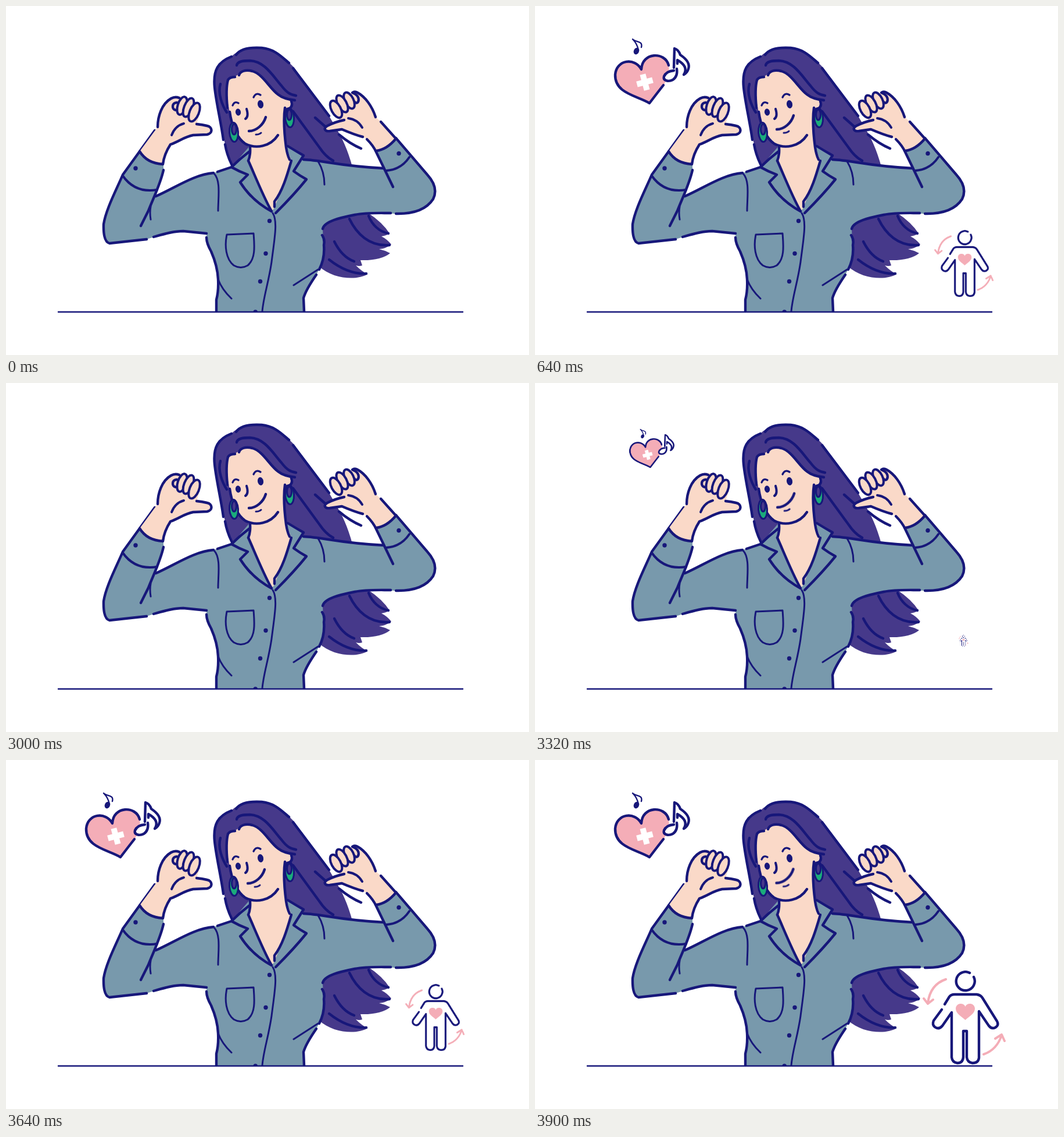
An HTML page without scripts that plays this animation: 900 px wide and 600 px high, repeating every 6 s.

```html
<!DOCTYPE html>
<html lang="en">
<head>
<meta charset="utf-8">
<title>Confident woman</title>
<style>
  :root { --ink: #17177a; --hair: #46398a; --skin: #fad9c8; --shirt: #7899ac; --pink: #f4adb7; --green: #1bab7b; }
  html, body { margin: 0; width: 100%; height: 100%; overflow: hidden; background: #fff; }
  svg { display: block; width: 100%; height: 100%; }
  path, ellipse, circle { stroke-linecap: round; stroke-linejoin: round; }
  .line { fill: none; stroke: var(--ink); stroke-width: 4.4; }
  .thin { fill: none; stroke: var(--ink); stroke-width: 3; }
  .fine { fill: none; stroke: var(--ink); stroke-width: 2.4; }
  .ink { fill: var(--ink); }
  .hair { fill: var(--hair); }
  .skin { fill: var(--skin); }
  .shirt { fill: var(--shirt); }
  .pink { fill: var(--pink); }
  .arrow { fill: none; stroke: var(--pink); stroke-width: 4; }
  .ring { fill: var(--green); stroke: var(--ink); stroke-width: 3; }
  .finger { fill: var(--skin); stroke: var(--ink); stroke-width: 4; }

  .music, .body, .mouth { animation: 3s infinite cubic-bezier(.3, .09, .58, .87); }
  .music { transform-origin: 200.5px 112.5px; animation-name: pop; }
  .body { transform-origin: 737px 443px; animation-name: pop-late; }
  .mouth { animation-name: smile; }
  @keyframes pop { 0% { transform: scale(0); } 20%, 100% { transform: none; } }
  @keyframes pop-late { 0%, 6.667% { transform: scale(0); } 30%, 100% { transform: none; } }
  @keyframes smile { 0% { transform: none; } 30%, 100% { transform: translate(-2.5px, -3.6px); } }
</style>
</head>
<body>
<svg viewBox="0 0 900 600">
  <!-- hair behind -->
  <g class="hair">
    <path d="M389 278C374 235 362 170 359 140C356 110 365 96 388 87C400 74 424 70 440 71C462 73 474 87 488 98L496 106L556 189L575 222Q588 246 597 280L480 300Z"/>
    <path d="M622 355Q648 372 660 391Q654 395 646 396Q656 401 663 410Q654 417 642 418Q652 420 661 425Q645 438 610 437L613 446Q608 448 602 446Q612 456 622 461C607 471 565 472 538 447L545 372Z"/>
  </g>
  <g class="line">
    <path d="M624 361C630 376 642 388 658 391M591 366C603 391 625 414 660 411M565 405C574 423 585 434 599 439M556 436C575 451 598 461 620 460"/>
    <path d="M494 181L540 244Q550 259 563 266M532 192L549 207M573 221Q592 237 611 245"/>
    <path d="M388 87C365 96 356 110 359 140C362 168 370 200 374 230M377 238Q380 256 389 274"/>
    <path d="M396 84C404 72 424 71 440 72C462 74 474 87 487 98M494 107L556 189"/>
    <path d="M369 134C364 150 372 171 380 183"/>
  </g>

  <!-- shirt -->
  <path class="shirt" d="M230 250L201 290C188 320 172 350 168 375Q167 405 178 408L242 401C275 391 290 387 305 387L345 391V398Q345 408 353 422Q364 447 365 470Q366 490 362 505V526H513L512 502Q516 488 534 462Q550 435 546 408L545 383C548 370 575 364 600 359C620 355 640 356 668 357Q718 358 735 332Q745 312 725 290L671 227L637 249L651 279C570 275 545 265 512 264V257L484 240H420L388 277L357 287C330 290 290 313 258 327L271 282V272Z"/>

  <!-- head and neck -->
  <path class="skin" d="M381 126Q384 122 394 121Q400 119 402 114Q412 109 424 112C442 117 454 142 468 152Q478 160 491 163Q495 176 480 175C477 195 479 220 482 243L491 265C484 290 474 318 460 350L456 351C442 326 427 288 417 266L420 243C398 232 388 205 384 178C380 160 379 140 381 126Z"/>
  <g class="line">
    <path d="M381 175C379 155 379 138 382 127Q385 122 394 122M401 119C403 112 412 109 424 112C442 117 454 142 468 152Q478 160 497 162"/>
    <path d="M397 102C398 95 408 94 420 94C445 95 459 120 474 137C483 149 490 153 499 154"/>
    <path d="M385 182C388 205 398 228 412 237C430 246 455 242 468 222"/>
    <path d="M491 164Q494 172 488 176M480 175C477 195 479 220 482 243Q484 256 488 264M420 243Q421 256 417 266"/>
    <path d="M414 177Q418 190 412 194" stroke-width="4"/>
    <path d="M390 171Q393 163 400 167M426 157Q430 148 438 153" stroke-width="3.300"/>
  </g>
  <ellipse class="ink" cx="399.500" cy="182.500" rx="4.600" ry="6" transform="rotate(-10 399.500 182.500)"/>
  <ellipse class="ink" cx="438" cy="169" rx="5" ry="7" transform="rotate(-10 438 169)"/>
  <g class="mouth line">
    <path d="M418 215C431 215 443 204 447 191"/>
    <path d="M430 221Q436 221 439 218" stroke-width="3"/>
  </g>
  <g class="ring">
    <ellipse cx="392" cy="217" rx="7.500" ry="16.500" transform="rotate(-4 392 217)"/>
    <ellipse class="hair" cx="392.500" cy="212" rx="4" ry="9"/>
    <ellipse cx="488" cy="192" rx="7.500" ry="16.500" transform="rotate(-4 488 192)"/>
    <ellipse class="hair" cx="487.500" cy="187" rx="4" ry="9"/>
  </g>

  <!-- shirt details -->
  <g class="line">
    <path d="M419 250Q402 263 388 277Q402 285 416 290L403 303C417 325 436 342 457 353"/>
    <path d="M417 266C427 288 442 326 456 351"/>
    <path d="M485 241Q498 249 512 257L495 284Q506 292 517 298Q496 324 464 356"/>
    <path d="M491 266C484 290 476 318 462 336V345"/>
    <path d="M258 327C290 313 325 289 357 287M364 285L388 277M512 264C545 265 570 275 650 279"/>
    <path d="M256 214L201 290C188 320 172 350 168 375Q167 405 178 408L242 401M254 397C275 391 290 387 305 387L345 391"/>
    <path d="M271 282C266 305 255 327 245 352L232 378"/>
    <path d="M671 227L725 290Q745 312 735 332Q718 358 671 357M662 356C640 356 620 355 600 359C575 364 548 370 545 383"/>
    <path d="M345 398Q345 408 353 422Q364 447 365 470Q366 490 362 505V525M544 394Q549 401 547 411Q549 434 539 453M534 462Q516 488 512 502L513 525"/>
  </g>
  <g class="thin">
    <path d="M358 288C370 300 365 330 365 352M537 267Q548 285 548 307M249 345Q247 355 249 367"/>
    <path d="M201 292C215 312 235 320 260 316M655 283Q680 281 694 260" stroke-width="4"/>
    <path d="M365 470Q372 488 388 503M495 480L537 453"/>
    <path d="M459 356C468 370 462 400 457 440C452 475 443 500 441 525"/>
    <path d="M380 393L426 391C428 415 429 435 416 446Q404 453 392 446C378 435 376 412 380 393Z"/>
  </g>
  <g class="ink">
    <circle cx="223" cy="279" r="3.700"/>
    <circle cx="676" cy="253.500" r="3.700"/>
    <circle cx="453.500" cy="369.500" r="3.700"/>
    <circle cx="447" cy="425.500" r="3.700"/>
    <circle cx="437.500" cy="473.500" r="3.700"/>
    <path d="M425.500 526a3.700 3.700 0 0 1 7.400 0z"/>
  </g>

  <!-- left hand -->
  <path class="skin" d="M230 250L261 208C261 190 268 168 284 159Q300 151 316 159Q336 168 333 186L328 203L346 206C356 210 356 219 346 221L322 222C306 225 298 233 283 238Q276 250 270 272C252 271 238 263 230 250Z"/>
  <g class="line">
    <path d="M230 250C238 263 252 271 270 272Q272 255 283 238C298 233 306 225 322 222L346 221C356 219 356 208 346 206Q338 204 328 203"/>
    <path d="M261 208C261 190 268 168 284 159Q291 155 298 158"/>
    <path d="M285 222Q291 206 306 202" stroke-width="4"/>
    <path d="M294 166C285 166 285 178 292 179"/>
  </g>
  <g class="finger">
    <ellipse cx="303" cy="171.500" rx="7.500" ry="16" transform="rotate(18 303 171.500)"/>
    <ellipse cx="314" cy="174.500" rx="7.500" ry="17" transform="rotate(22 314 174.500)"/>
    <ellipse cx="324" cy="182.500" rx="8" ry="17" transform="rotate(22 324 182.500)"/>
  </g>

  <!-- right hand -->
  <path class="skin" d="M645 199L671 228Q655 247 637 249Q632 240 621 228L603 221L578 212L557 215C548 216 546 209 553 206L575 197L561 184C555 176 558 164 568 163Q570 152 580 154Q585 147 594 150Q600 145 605 149C618 156 630 172 636 191Z"/>
  <g class="line">
    <path d="M636 191C630 172 618 156 605 149Q600 146 596 149"/>
    <path d="M582 196Q567 199 553 206C546 210 548 216 557 215L578 212C592 218 602 222 614 225"/>
    <path d="M589 193Q605 195 613 209" stroke-width="4"/>
    <path d="M598 150C606 153 609 161 605 166Q602 168 599 164"/>
    <path d="M645 199L671 228Q655 247 637 249M621 229Q632 240 637 251L666 311"/>
  </g>
  <g class="finger">
    <ellipse cx="590.500" cy="162.500" rx="7.500" ry="15" transform="rotate(-26 590.500 162.500)"/>
    <ellipse cx="578.500" cy="168" rx="7.500" ry="16" transform="rotate(-28 578.500 168)"/>
    <ellipse cx="568" cy="177.500" rx="8" ry="16" transform="rotate(-28 568 177.500)"/>
  </g>

  <path class="fine" d="M90 526H786"/>

  <!-- heart and notes -->
  <g class="music">
    <path class="pink" d="M230 102C224 78 184 79 183 109C172 88 140 92 138 118C137 150 175 154 197 167Q211 150 221 136Q233 120 230 102Z"/>
    <path class="line" d="M230 102C224 78 184 79 183 109C172 88 140 92 138 118C137 150 175 154 197 167Q210 150 221 136"/>
    <path d="M189 117V145M175 131H203" transform="rotate(-15 189 131)" style="stroke:#fff;stroke-width:10;stroke-linecap:butt"/>
    <path d="M239 110L240 73Q247 75 250 84Q268 96 264 108Q262 115 256 118Q260 104 245 93V112L243 121C238 131 222 132 222 123C223 114 232 109 239 110Z" fill="#fff"/>
    <g class="line">
      <path d="M239 106L240 73Q247 75 250 84Q268 96 264 108Q262 115 256 118Q265 104 245 93V99"/>
      <path d="M244 108Q246 121 237 127C229 131 220 128 222 121Q226 112 239 111"/>
    </g>
    <ellipse class="ink" cx="174.500" cy="77.500" rx="4.500" ry="6" transform="rotate(25 174.500 77.500)"/>
    <path class="fine" d="M178 76Q176 65 168 57C173 63 186 59 183 71"/>
  </g>

  <!-- body icon -->
  <g class="body">
    <g class="line">
      <path d="M748 366A16 16 0 1 0 755 373"/>
      <path d="M705 420L713 407Q716 403 722 403H760Q767 404 770 409L795 449Q799 456 792 460Q786 463 781 457L764 432V512Q763 521 753 521Q744 520 743 511V466H737V511Q736 521 727 521Q718 520 717 511V434L701 457Q695 464 688 459Q683 455 686 448L700 429"/>
    </g>
    <path class="pink" d="M740.500 447C733 440 724 436 724 427C725 417 738 417 740.500 424C743 417 756 417 757 427C757 436 748 440 740.500 447Z"/>
    <path class="arrow" d="M707 377Q680 386 676 418M669 410L676 419L685 412M772 506Q795 498 803 473M792 479L803 472L808 483"/>
  </g>
</svg>
</body>
</html>
```
